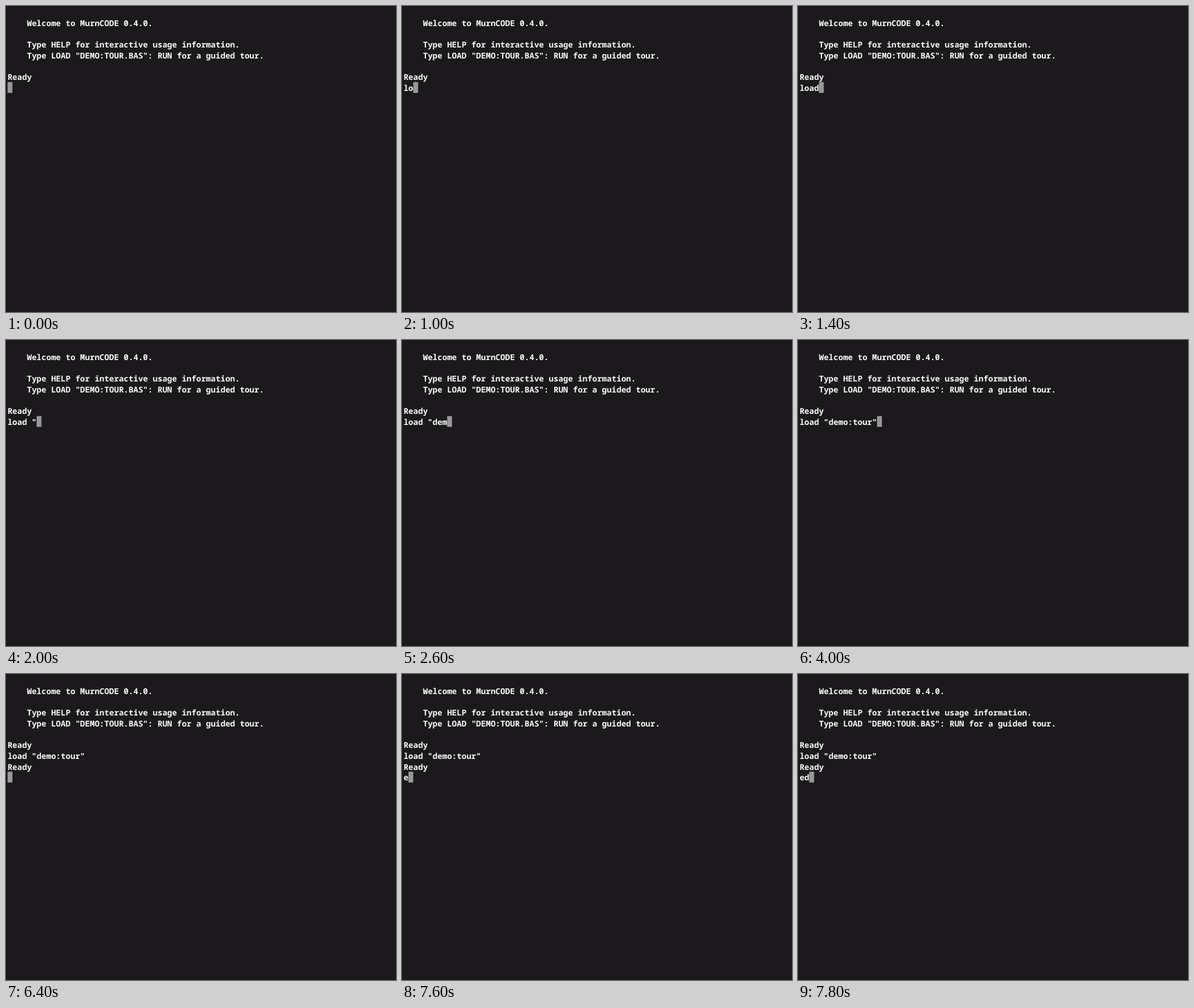
An HTML page for the animation above (8 s loop, 600x472 px).

```html
<!DOCTYPE html>
<html lang="en">
<head>
<meta charset="utf-8">
<title>Terminal session</title>
<style>
  html, body { margin: 0; width: 100%; height: 100%; overflow: hidden; background: #1b191b; }
  svg { display: block; width: 600px; height: 472px; }
  text {
    font: 600 12.42px "Noto Sans Mono", "DejaVu Sans Mono", monospace;
    font-variant-ligatures: none;
    text-rendering: geometricPrecision;
    white-space: pre;
    fill: #fbfafb;
  }
  #cursor { fill: #99979a; }
</style>
</head>
<body>
<svg id="screen" viewBox="0 0 600 472"><rect id="cursor" width="7.45" height="16.69"/></svg>
<script>
const LOOP = 8000;
const TICK = 200;
const ENTER = 6400;
const CELL = { w: 7.452, h: 16.69 };
const ORIGIN = { x: 2.4, y: 0.5 };
const BASELINE = 13.6;

// Bursts of typing: each adds `rate` characters per tick.
const COMMAND = [
  { at: 800, keys: 'load ' },
  { at: 2000, keys: '"demo:' },
  { at: 3400, keys: 'tour', rate: 2 },
  { at: 4000, keys: '"' }
];
const NEXT = [{ at: 7600, keys: 'ed' }];

const screen = document.getElementById('screen');
const cursor = document.getElementById('cursor');
const colX = col => ORIGIN.x + col * CELL.w;
const rowY = row => ORIGIN.y + row * CELL.h;

function addLine(row, col, str = '') {
  const line = document.createElementNS('http://www.w3.org/2000/svg', 'text');
  line.setAttribute('x', colX(col));
  line.setAttribute('y', rowY(row) + BASELINE);
  line.textContent = str;
  screen.append(line);
  return line;
}

addLine(1, 4, 'Welcome to MurnCODE 0.4.0.');
addLine(3, 4, 'Type HELP for interactive usage information.');
addLine(4, 4, 'Type LOAD "DEMO:TOUR.BAS": RUN for a guided tour.');
addLine(6, 0, 'Ready');
const command = addLine(7, 0);
const reply = addLine(8, 0);
const next = addLine(9, 0);

function typed(bursts, time) {
  return bursts.map(({ at, keys, rate = 1 }) => {
    const ticks = Math.floor((time - at) / TICK) + 1;
    return keys.slice(0, Math.max(0, ticks) * rate);
  }).join('');
}

function render(time) {
  const entered = time >= ENTER;
  command.textContent = typed(COMMAND, time);
  reply.textContent = entered ? 'Ready' : '';
  next.textContent = typed(NEXT, time);
  const active = entered ? next : command;
  cursor.setAttribute('x', colX(active.textContent.length));
  cursor.setAttribute('y', rowY(entered ? 9 : 7));
}

const start = performance.now();
function frame() {
  render((performance.now() - start) % LOOP);
  requestAnimationFrame(frame);
}
frame();
</script>
</body>
</html>
```
